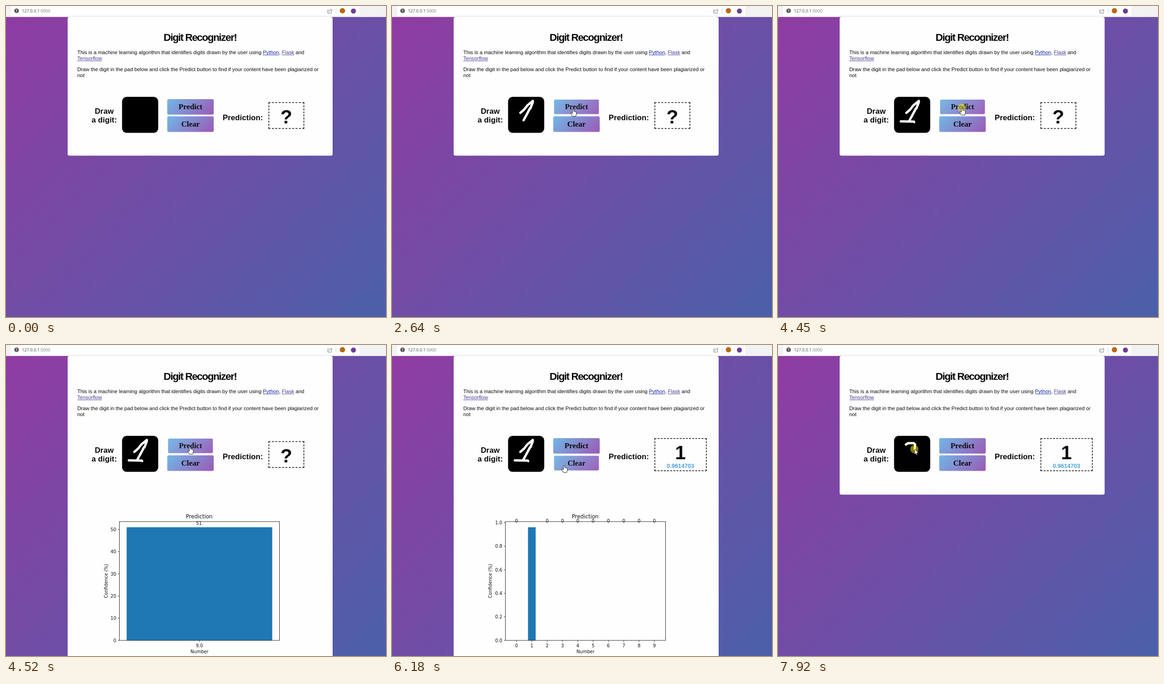
An HTML page with a canvas that plays this animation: 826 by 678 pixels, repeating every 7.99 s.

```html
<!DOCTYPE html>
<html lang="en">
<head>
<meta charset="utf-8">
<title>Digit Recognizer!</title>
<style>
html, body { margin: 0; width: 100%; height: 100%; overflow: hidden; background: #6e4ea5; }
canvas { display: block; }
</style>
</head>
<body>
<canvas id="stage" width="826" height="678"></canvas>
<script>
const ctx = document.getElementById('stage').getContext('2d');
const LOOP = 7990, TICK = 66.58;
const SANS = '"Liberation Sans", Arial, sans-serif';
const SERIF = '"Liberation Serif", "Times New Roman", serif';
const PLOT = '"DejaVu Sans", sans-serif';
const CLICK = 4460, RESULT = 4650, CLEARED = 6250;

// pointer keys: time, x, y, button held
const keys = [
  [130, 654, 558, 0], [460, 470, 380, 0], [660, 300, 262, 0], [800, 254, 236, 0],
  [860, 279, 241, 0], [930, 279, 241, 0],
  [990, 279, 233, 1], [1120, 287, 226, 1], [1260, 294, 217, 1], [1400, 306, 207, 1],
  [1460, 306, 210, 1], [1590, 301, 223, 1], [1720, 300, 223, 1], [1930, 291, 240, 1],
  [2110, 286, 249, 1], [2330, 286, 249, 1],
  [2380, 290, 245, 0], [2580, 395, 225, 0], [2700, 385, 222, 0], [2980, 280, 254, 0],
  [3140, 280, 254, 0], [3250, 266, 254, 0], [3340, 266, 254, 0],
  [3390, 267, 251.5, 1], [3790, 295, 252, 1], [3870, 295, 252, 1], [3930, 296, 253, 1],
  [3990, 300, 250, 0], [4260, 398, 224, 0],
  [4390, 400, 222, 1], [CLICK, 400, 222, 0], [4800, 400, 222, 0], [4850, 401, 223, 0],
  [5520, 401, 223, 0], [5840, 374, 262, 0],
  [6180, 374, 262, 1], [CLEARED, 374, 262, 0], [6970, 278, 217, 0],
  [7240, 278, 217, 1], [7400, 283, 214, 1], [7660, 295, 214, 1], [7790, 298, 217, 1],
  [7920, 297, 227, 1]
];

function mix(a, b, t) {
  const k = Math.max(0, Math.min(1, (t - a[0]) / (b[0] - a[0])));
  return { x: a[1] + (b[1] - a[1]) * k, y: a[2] + (b[2] - a[2]) * k };
}

function pointer(t) {
  if (t < keys[0][0]) return null;
  let i = keys.length - 1;
  while (keys[i][0] > t) i--;
  const a = keys[i];
  return { ...mix(a, keys[i + 1] || [LOOP, a[1], a[2]], t), held: a[3] };
}

function text(s, x, y, font, color = '#0a0a0a', align = 'left', gap = '0px') {
  ctx.font = font;
  ctx.fillStyle = color;
  ctx.textAlign = align;
  ctx.letterSpacing = gap;
  ctx.fillText(s, x, y);
  return ctx.measureText(s).width;
}

function rect(x, y, w, h, color) {
  ctx.fillStyle = color;
  ctx.fillRect(x, y, w, h);
}

function round(x, y, w, h, r, color) {
  ctx.fillStyle = color;
  ctx.beginPath();
  ctx.roundRect(x, y, w, h, r);
  ctx.fill();
}

function dot(x, y, r, color) {
  ctx.fillStyle = color;
  ctx.beginPath();
  ctx.arc(x, y, r, 0, 7);
  ctx.fill();
}

function line(points, color, width) {
  ctx.strokeStyle = color;
  ctx.lineWidth = width;
  ctx.beginPath();
  points.forEach(([x, y]) => ctx.lineTo(x, y));
  ctx.stroke();
}

// same geometry as a CSS 135deg gradient
function diagonal(x, y, w, h, from, to) {
  const d = (w + h) / 4, cx = x + w / 2, cy = y + h / 2;
  const g = ctx.createLinearGradient(cx - d, cy - d, cx + d, cy + d);
  g.addColorStop(0, from);
  g.addColorStop(1, to);
  return g;
}

function browserBar() {
  rect(0, 0, 826, 24, '#f2f2f3');
  round(11, -6, 757, 27, 3, '#fefefe');
  dot(23, 10.5, 5, '#5b5257');
  rect(22.4, 7.5, 1.3, 3.6, '#fff');
  rect(22.4, 12, 1.3, 1.3, '#fff');
  const font = '9.1px "Open Sans", sans-serif';
  const w = text('127.0.0.1', 34.5, 14, font, '#45454a');
  text(':5000', 34.5 + w, 14, font, '#77777c');
  line([[702, 8.5], [699.5, 8.5], [699.5, 15.5], [707.5, 15.5], [707.5, 12.5]], '#77778a', 1);
  line([[702, 13], [702.5, 10.5], [704.5, 9], [708.5, 9]], '#77778a', 1);
  line([[706, 6.3], [708.8, 9], [706, 11.7]], '#77778a', 1);
  rect(717, 6, 1, 10, '#cfcfd4');
  dot(731.3, 10.3, 5.8, '#b9670f');
  dot(755.2, 11, 5.5, '#6c3c96');
}

function intro() {
  const font = '11.22px ' + SANS;
  text('Digit Recognizer!', 342.5, 76, 'bold 22.4px ' + SANS, '#0a0a0a', 'left', '-1.5px');
  let x = 155;
  const put = s => { x += text(s, x, 105, font); };
  const link = (s, y, color) => {
    const w = text(s, x, y, font, color);
    rect(x, y + 1.3, w, 0.9, color);
    x += w;
  };
  put('This is a machine learning algorithm that identifies digits drawn by the user using ');
  link('Python', 105, '#0f1fa8');
  put(', ');
  link('Flask', 105, '#4b3a92');
  put(' and');
  x = 155;
  link('Tensorflow', 118, '#4b3a92');
  text('Draw the digit in the pad below and click the Predict button to find if your content have been plagiarized or', 155, 142, font);
  text('not', 155, 154.5, font);
}

const over = (p, y) => p && p.x > 350 && p.x < 452 && p.y > y && p.y < y + 34;

function button(label, y, hot) {
  ctx.save();
  if (hot) {
    ctx.translate(401, y + 17);
    ctx.scale(0.965, 0.94);
    ctx.translate(-401, -y - 17);
    ctx.globalAlpha = 0.96;
  }
  round(350.5, y, 101, 33.8, 3, diagonal(350.5, y, 101, 33.8, '#71b7e6', '#9b59b6'));
  text(label, 401, y + 22.4, 'bold 16.8px ' + SERIF, '#0a0a0a', 'center');
  ctx.restore();
}

function ink(t) {
  const from = t < CLEARED ? 0 : CLEARED;
  ctx.strokeStyle = '#fff';
  ctx.lineWidth = 5;
  ctx.lineCap = ctx.lineJoin = 'round';
  ctx.beginPath();
  for (let i = 0; i < keys.length && keys[i][0] <= t; i++) {
    const a = keys[i], b = keys[i + 1];
    if (a[0] < from || !a[3] || a[1] > 331) continue;
    ctx.moveTo(a[1], a[2]);
    if (b && b[3]) {
      const p = mix(a, b, t);
      ctx.lineTo(p.x, p.y);
    }
  }
  ctx.stroke();
  ctx.lineCap = 'butt';
  ctx.lineJoin = 'miter';
}

function dashedBox(x, y, w, h) {
  const side = (a, b, len) => {
    const n = Math.round((len - 4.2) / 7);
    ctx.setLineDash([4.2, (len - 4.2) / n - 4.2]);
    line([a, b], '#0a0a0a', 1.5);
  };
  side([x, y + 0.7], [x + w, y + 0.7], w);
  side([x, y + h - 0.7], [x + w, y + h - 0.7], w);
  side([x + 0.7, y], [x + 0.7, y + h], h);
  side([x + w - 0.7, y], [x + w - 0.7, y + h], h);
  ctx.setLineDash([]);
}

function prediction(known) {
  text('Prediction:', 471, 249, 'bold 16.8px ' + SANS);
  const big = 'bold 42px ' + SANS;
  if (known) {
    dashedBox(570.7, 203, 113.3, 72);
    text('1', 627, 249, big, '#0a0a0a', 'center');
    text('0.9614703', 627, 268.3, 'bold 12.6px ' + SANS, '#4ba3dd', 'center');
  } else {
    dashedBox(570.7, 209.7, 77.5, 58);
    text('?', 609.3, 255.5, big, '#0a0a0a', 'center');
  }
}

function chart(final) {
  const L = 246.5, R = 594.5, T = 385, B = 644, ink = '#111';
  const font = '9.74px ' + PLOT, mid = (L + R) / 2;
  const top = 1.05 * (final ? 0.9614703 : 51);
  const yAt = v => B - v / top * (B - T);
  const slot = (R - L) / 10.45, xAt = i => L + (0.725 + i) * slot;
  const tickX = (x, s) => {
    line([[x, B], [x, B + 3.4]], ink, 0.8);
    text(s, x, 658.5, font, ink, 'center');
  };
  const barTop = yAt(top / 1.05);
  if (final) rect(xAt(0.75), barTop, slot / 2, B - barTop, '#1f77b4');
  else rect(L + 15.8, barTop, R - L - 31.6, B - barTop, '#1f77b4');

  for (let i = 0; i < 6; i++) {
    const v = i * (final ? 0.2 : 10), y = yAt(v);
    line([[L - 3.4, y], [L, y]], ink, 0.8);
    text(final ? v.toFixed(1) : String(v), L - 6.8, y + 3.6, font, ink, 'right');
  }
  ctx.strokeStyle = ink;
  ctx.lineWidth = 0.9;
  ctx.strokeRect(L, T, R - L, B - T);

  if (final) {
    for (let i = 0; i < 10; i++) {
      tickX(xAt(i), String(i));
      if (i !== 1) text('0', xAt(i), 387, font, ink, 'center');
    }
  } else {
    tickX(mid, '9.0');
    text('51', mid - 1, 391.5, font, ink, 'center');
  }
  text('Prediction', mid - 0.5, 378, '11.69px ' + PLOT, ink, 'center');
  text('Number', mid, 671.5, font, ink, 'center');
  ctx.save();
  ctx.translate(final ? 217.3 : 221, 514.5);
  ctx.rotate(-Math.PI / 2);
  text('Confidence (%)', 0, 0, font, ink, 'center');
  ctx.restore();
}

const arrow = new Path2D('M0 0V11.6L2.7 9.2L4.5 13.2L6.2 12.4L4.5 8.5H8.2Z');
const hand = new Path2D('M-1.4 1Q0-.6 1.4 1V5.2Q3 4.7 3.6 5.8Q5 5.4 5.6 6.5Q7.2 6.4 7.3 8V11.4L5.8 16H-1.2L-4.8 10.2Q-5.2 7.8-3 8.4L-1.4 10Z');

function cursor(p, hot) {
  if (p.held) dot(p.x - 0.6, p.y, 8.8, 'rgba(255,242,0,.5)');
  ctx.save();
  ctx.translate(p.x, p.y);
  const shape = hot ? hand : arrow;
  ctx.fillStyle = '#fff';
  ctx.fill(shape);
  ctx.strokeStyle = '#111';
  ctx.lineWidth = hot ? 0.9 : 0.7;
  ctx.stroke(shape);
  ctx.restore();
}

function draw(t) {
  const p = pointer(t), onPredict = over(p, 203), onClear = over(p, 240.5);
  const plotted = t >= CLICK && t < CLEARED;
  rect(0, 24, 826, 654, diagonal(0, 24, 826, 654, '#903ca2', '#4b60a9'));
  browserBar();
  round(134, 24, 576, plotted ? 670 : 302.3, 4, '#fefefe');
  intro();
  const bold = 'bold 16.8px ' + SANS;
  text('Draw', 213.5, 234.5, bold, '#0a0a0a', 'center');
  text('a digit:', 213.5, 254, bold, '#0a0a0a', 'center');
  round(252.3, 198, 78.6, 78.6, 10, '#000');
  ink(t);
  button('Predict', 203, onPredict);
  button('Clear', 240.6, onClear);
  prediction(t >= RESULT);
  if (plotted) chart(t >= RESULT);
  if (p) cursor(p, onPredict || onClear);
}

const start = performance.now();
function frame() {
  const t = (performance.now() - start) % LOOP;
  draw(Math.floor((t + 9) / TICK) * TICK);
  requestAnimationFrame(frame);
}
frame();
</script>
</body>
</html>
```
